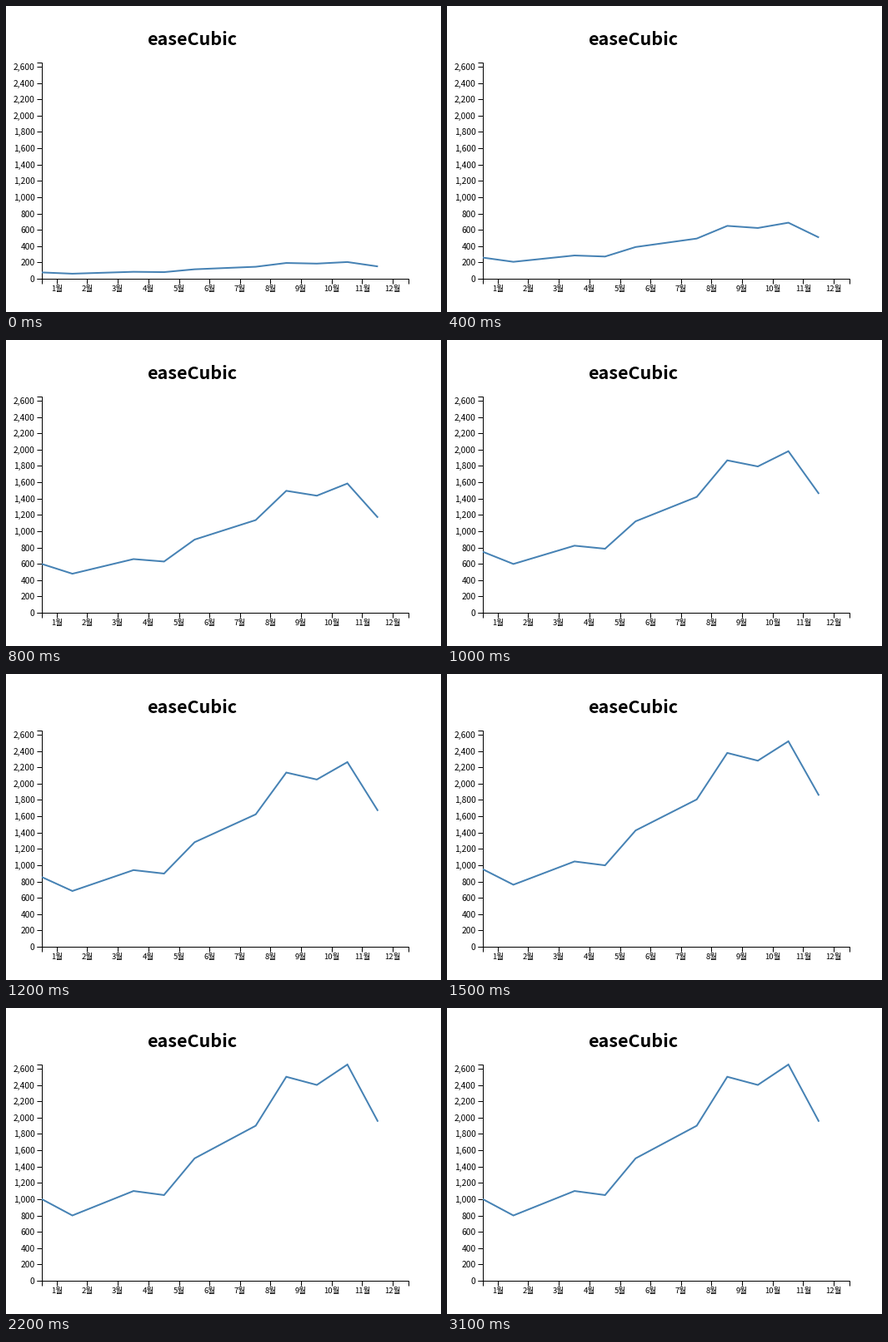
Recreate the animation shown at these times as a matplotlib script. Size 522 px wide and 368 px high, loop 4800 ms.

```python
import math

import matplotlib.pyplot as plt
from matplotlib.animation import FuncAnimation

WIDTH, HEIGHT, DPI = 522, 368, 64
PT = 72 / DPI  # points per pixel
LEFT, TOP, PLOT_W, PLOT_H = 43, 68, 440, 260
BOTTOM = TOP + PLOT_H
Y_MAX = 2650
SALES = [1000, 800, 950, 1100, 1050, 1500, 1700, 1900, 2500, 2400, 2650, 1950]
BAND = PLOT_W / len(SALES)

STEP_MS, LOOP_MS = 100, 4800
EASE_MS, LEAD_MS = 3000, 805  # the loop opens with the easing under way
POINTER_MS = 3000

plt.rcParams["font.family"] = ["Noto Sans CJK JP", "DejaVu Sans"]

fig = plt.figure(figsize=(WIDTH / DPI, HEIGHT / DPI), dpi=DPI, facecolor="white")
ax = fig.add_axes([0, 0, 1, 1])
ax.set_xlim(0, WIDTH)
ax.set_ylim(HEIGHT, 0)
ax.axis("off")


def y_pos(value):
    return BOTTOM - PLOT_H * value / Y_MAX


def ease_cubic(t):
    t = min(max(t, 0), 1)
    return 4 * t**3 if t < 0.5 else 1 - 4 * (1 - t) ** 3


def stroke(xs, ys):
    # Points already lie on pixel centres; snapping would move them by one pixel
    ax.plot(xs, ys, color="black", lw=PT, solid_capstyle="butt",
            solid_joinstyle="miter", snap=False)


def label(x, y, text, size, align="center", weight="normal"):
    ax.text(x, y, text, fontsize=size * PT, ha=align, va="baseline",
            weight=weight, color="black")


def draw_y_axis():
    x = LEFT + 0.5
    stroke([x - 6, x, x, x - 6], [TOP + 0.5, TOP + 0.5, BOTTOM + 0.5, BOTTOM + 0.5])
    for value in range(0, 2601, 200):
        y = math.floor(y_pos(value) + 0.5) + 0.5
        stroke([x - 6, x], [y, y])
        label(x - 9, y + 3.5, f"{value:,}", 10.2, "right")


def draw_x_axis():
    y = BOTTOM + 0.5
    left, right = LEFT + 0.5, LEFT + PLOT_W + 0.5
    stroke([left, left, right, right], [y + 6, y, y, y + 6])
    for month in range(len(SALES)):
        center = left + month * BAND + (BAND - 1) / 2
        tick = math.floor(center) + 0.5
        stroke([tick, tick], [y, y + 6])
        label(center - 0.6, y + 15, f"{month + 1}월", 9.5)


label(223, 47, "easeCubic", 21.5, weight="bold")
draw_y_axis()
draw_x_axis()

xs = [LEFT + i * BAND for i in range(len(SALES))]
curve, = ax.plot(xs, [BOTTOM] * len(xs), color="steelblue", lw=2 * PT,
                 solid_capstyle="butt", solid_joinstyle="miter",
                 snap=False, zorder=3)

# Mouse pointer that passes by for a single step
px, py = 464.5, 318.5
arrow = [(0, 0), (0, 15), (3.4, 11.8), (5.8, 17), (8, 16), (5.8, 11), (10.8, 11)]
pointer, = ax.fill([px + x for x, _ in arrow], [py + y for _, y in arrow],
                   facecolor="black", edgecolor="white", lw=PT, zorder=4)


def update(frame):
    now = frame * STEP_MS
    grown = ease_cubic((now + LEAD_MS) / EASE_MS)
    curve.set_ydata([y_pos(value * grown) for value in SALES])
    pointer.set_visible(now == POINTER_MS)
    return curve, pointer


animation = FuncAnimation(fig, update, frames=LOOP_MS // STEP_MS,
                          interval=STEP_MS, repeat=True, repeat_delay=0)
plt.show()
```
